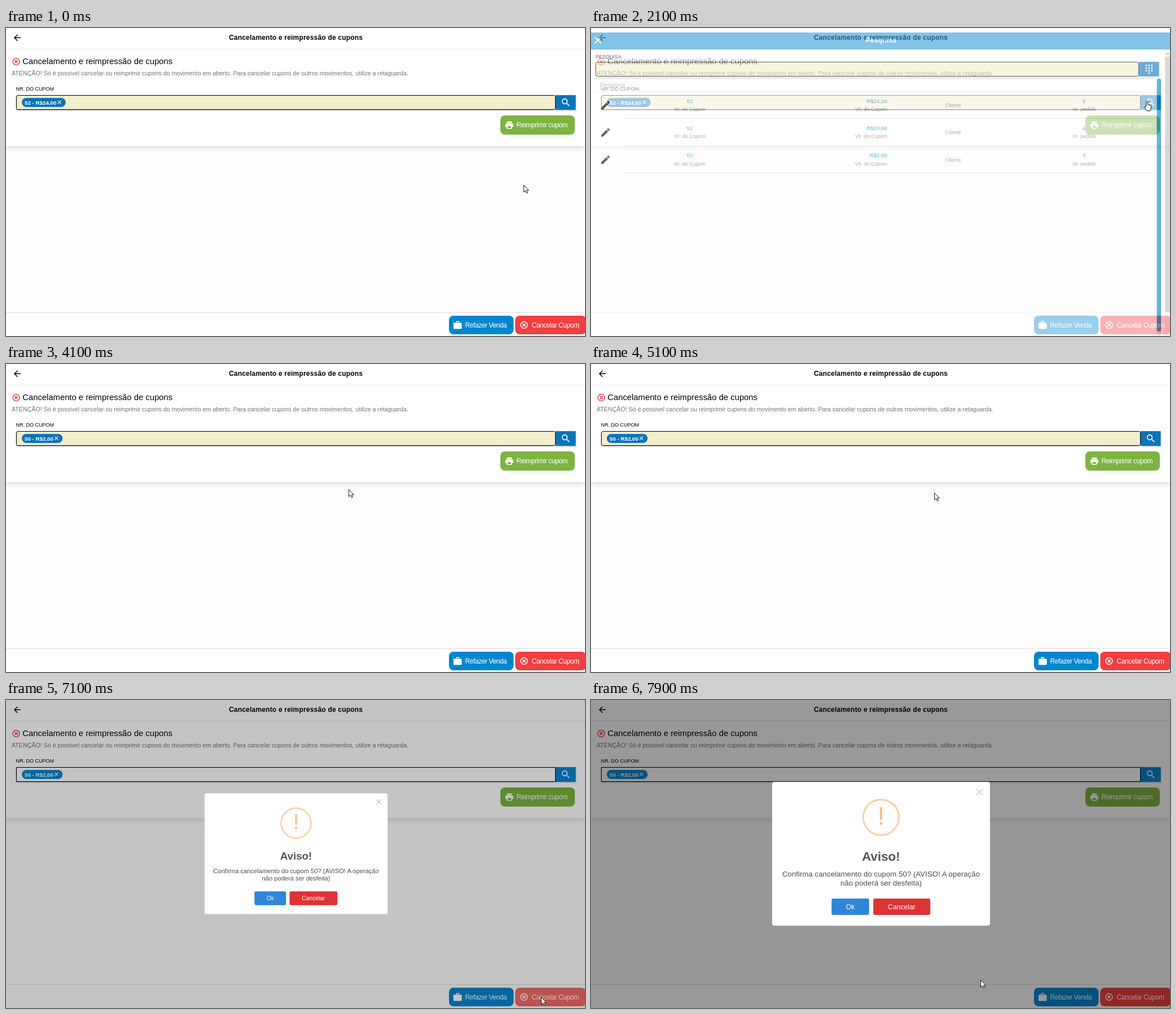
An HTML page for the animation above (8 s loop, 1026x546 px).

```html
<!DOCTYPE html>
<html lang="pt-BR">
<head>
<meta charset="utf-8">
<title>Cancelamento de cupons</title>
<style>
html, body { margin: 0; width: 100%; height: 100%; overflow: hidden; background: #fff; }
svg { display: block; width: 100vw; height: 100vh; font-family: "Liberation Sans", Arial, sans-serif; }
text { white-space: pre; }
.title { font-weight: bold; font-size: 12px; letter-spacing: .2px; text-anchor: middle; }
.label { font-size: 9px; }
.btn { font-size: 12px; letter-spacing: -.43px; fill: #fff; }
.chip { font-weight: bold; font-size: 9.75px; fill: #fff; }
.value { font-size: 9.75px; fill: #0086cc; }
.hint { font-size: 9px; fill: #777; }
.mid { text-anchor: middle; }
.end { text-anchor: end; }
.line { fill: none; stroke-linecap: butt; }
.card { filter: drop-shadow(0 3px 4px rgba(0, 0, 0, .14)); }
.lift { filter: drop-shadow(0 1px 1px rgba(0, 0, 0, .35)); }
</style>
</head>
<body>
<svg viewBox="0 0 1026 546" preserveAspectRatio="none">
  <defs>
    <path id="back" d="M20 11H7.83l5.59-5.59L12 4l-8 8 8 8 1.41-1.41L7.83 13H20z"/>
    <path id="find" d="M15.5 14h-.79l-.28-.27A6.47 6.47 0 0 0 16 9.5 6.5 6.5 0 1 0 9.5 16c1.61 0 3.09-.59 4.23-1.57l.27.28v.79l5 4.99L20.49 19zm-6 0a4.5 4.5 0 1 1 0-9 4.5 4.5 0 0 1 0 9z"/>
    <path id="print" d="M19 8H5a3 3 0 0 0-3 3v6h4v4h12v-4h4v-6a3 3 0 0 0-3-3zm-3 11H8v-5h8zm3-7a1 1 0 1 1 0-2 1 1 0 0 1 0 2zM18 3H6v4h12z"/>
    <path id="bag" d="M20 6h-4V4a2 2 0 0 0-2-2h-4a2 2 0 0 0-2 2v2H4a2 2 0 0 0-2 2v11a2 2 0 0 0 2 2h16a2 2 0 0 0 2-2V8a2 2 0 0 0-2-2zm-6 0h-4V4h4z"/>
    <path id="edit" d="M3 17.25V21h3.75L17.81 9.94l-3.75-3.75zM20.71 7.04a1 1 0 0 0 0-1.41l-2.34-2.34a1 1 0 0 0-1.41 0l-1.83 1.83 3.75 3.75z"/>
    <path id="cross" class="line" d="M-1-1L1 1M1-1L-1 1" vector-effect="non-scaling-stroke"/>
    <g id="ban" class="line" stroke-width="1.5">
      <circle r="6"/>
      <path d="M-2.6-2.6L2.6 2.6M2.6-2.6L-2.6 2.6"/>
    </g>
  </defs>

  <g id="page">
    <rect width="1026" height="546" fill="#fdfdfd"/>
    <rect class="card" y="20" width="1026" height="189.5" rx="4" fill="#fff"/>
    <rect width="1026" height="37" fill="#fff"/>
    <rect y="37" width="1026" height="1" fill="#e6e6e6"/>
    <use href="#back" transform="translate(11 8.2) scale(.75)"/>
    <text class="title" x="513.6" y="21">Cancelamento e reimpressão de cupons</text>
    <use href="#ban" x="18" y="59.5" stroke="#f04141"/>
    <text x="29.3" y="64" font-size="14.8">Cancelamento e reimpressão de cupons</text>
    <text x="10" y="84" font-size="10.67" fill="#737373">ATENÇÃO! Só é possivel cancelar ou reimprimir cupons do movimento em aberto. Para cancelar cupons de outros movimentos, utilize a retaguarda.</text>
    <text class="label" x="17.5" y="111.3">NR. DO CUPOM</text>
    <g class="lift">
      <rect id="field" x="18.5" y="119.5" width="955" height="25" stroke="#000"/>
      <rect id="search" x="974" y="119" width="35.5" height="26"/>
    </g>
    <use href="#find" fill="#fff" transform="translate(982.6 122.5) scale(.79)"/>
    <rect id="chip" x="28" y="124" height="16" rx="8"/>
    <text id="chipText" class="chip" x="33" y="136.2"></text>
    <use id="chipX" href="#cross" stroke="#fff" stroke-width="1.1"/>
    <rect id="reprint" x="876" y="155" width="132" height="34" rx="8"/>
    <use href="#print" fill="#fff" transform="translate(883.3 163.6) scale(.72)"/>
    <text class="btn" x="904.5" y="176.4">Reimprimir cupom</text>
    <rect y="504" width="1026" height="42" fill="#fff"/>
    <rect y="504" width="1026" height="1" fill="#dcdcdc"/>
    <rect x="785" y="510" width="114.5" height="33" rx="8" fill="#0086d1"/>
    <use href="#bag" fill="#fff" transform="translate(791.4 518) scale(.74)"/>
    <text class="btn" x="813.5" y="530.7">Refazer Venda</text>
    <rect id="cancel" x="902.3" y="510" width="125.5" height="33" rx="8"/>
    <use href="#ban" x="918" y="526.5" stroke="#fff"/>
    <text class="btn" x="931.5" y="530.7">Cancelar Cupom</text>
  </g>

  <g id="lookup">
    <rect width="1026" height="546" fill="#fff"/>
    <rect width="1026" height="30" fill="#329cd4"/>
    <use href="#cross" stroke="#fff" stroke-width="1.8" transform="translate(12.3 13.5) scale(5.7)"/>
    <text class="title" x="514" y="17.5" fill="#fff">Pesquisa</text>
    <text class="label" x="8" y="46">PESQUISA</text>
    <g class="lift">
      <rect x="8.5" y="52.5" width="962" height="25" rx="3" fill="#f4efce" stroke="#000"/>
      <rect x="971" y="52" width="35.5" height="25.5" fill="#0b74b8"/>
    </g>
    <g id="dots" fill="#fff"></g>
    <rect x="5" y="80" width="998" height="1" fill="#ededed"/>
    <rect x="5" y="81" width="998" height="1" fill="#d2d2d2"/>
    <rect x="5" y="82" width="998" height="1" fill="#efefef"/>
    <text x="16" y="96.5" font-size="10.5" fill="#999">Registros</text>
    <rect x="5" y="104" width="998" height="1" fill="#dedede"/>
    <g id="rows"></g>
    <rect x="1003" y="82" width="7" height="464" fill="#e2e2e2"/>
    <rect x="1002.7" y="82" width="7.5" height="448" rx="3" fill="#0880be"/>
    <rect x="1017" y="30" width="9" height="516" fill="#f1f1f1"/>
    <rect x="1017.5" y="43" width="8.5" height="452" fill="#c1c1c1"/>
    <path d="M1019 39l3-3 3 3z" fill="#888"/>
    <path d="M1019 539l3 3 3-3z" fill="#444"/>
  </g>

  <rect id="shade" width="1026" height="546"/>
  <g id="dialog">
    <rect x="321" y="145" width="386" height="255" rx="4" fill="#fff"/>
    <use href="#cross" stroke="#c4c4c4" stroke-width="1.3" transform="translate(688.5 163.2) scale(5.2)"/>
    <circle cx="514" cy="208" r="31.6" fill="none" stroke="#facea8" stroke-width="3"/>
    <text class="mid" x="514" y="220.5" font-size="45" fill="#f8bb86">!</text>
    <text class="mid" x="514" y="285" font-size="22.3" font-weight="bold" fill="#555">Aviso!</text>
    <g class="mid" font-size="13.3" fill="#4c4c4c">
      <text x="514" y="313">Confirma cancelamento do cupom 50? (AVISO! A operação</text>
      <text x="514" y="329.3">não poderá ser desfeita)</text>
    </g>
    <rect x="426.3" y="352" width="66.5" height="29" rx="3" fill="#3085d6"/>
    <rect x="500.2" y="352" width="101" height="29" rx="3" fill="#d33"/>
    <g class="mid" font-size="12.2" fill="#fff">
      <text x="459.5" y="371">Ok</text>
      <text x="550.5" y="371">Cancelar</text>
    </g>
  </g>

  <g id="cursor" fill="#fff" stroke="#000" stroke-linejoin="round">
    <path id="arrow" stroke-width=".9" d="M0 0V12.6L2.9 9.9 5 14.4 7 13.5 5 9.2H8.9Z"/>
    <path id="hand" d="M-1.2 9.5V1.8a1.4 1.4 0 0 1 2.8 0V6.2l4.4 1.1c1.2.3 1.6.9 1.5 2.2l-.5 4.4c-.2 1.5-1 3.4-1 3.4H.2l-4-5.6c-1-1.6.6-2.8 1.6-1.6Z"/>
  </g>
</svg>
<script>
const $ = id => document.getElementById(id);
const set = (id, attrs) => {
  for (const k in attrs) $(id).setAttribute(k, attrs[k]);
};
const show = (id, on) => { $(id).style.display = on ? '' : 'none'; };

// Static lists
let dots = '';
for (let i = 0; i < 10; i++) {
  const col = i < 9 ? i % 3 : 1;
  dots += `<circle cx="${984 + col * 4.9}" cy="${58.3 + Math.floor(i / 3) * 4.6}" r="1.5"/>`;
}
$('dots').innerHTML = dots;

$('rows').innerHTML = [[52, '24,00', 5], [51, '20,00', 4], [50, '2,00', 3]].map(([nr, sum, order], i) => `
  <g transform="translate(0 ${i * 48.3})">
    <use href="#edit" transform="translate(15.7 119) scale(.83)"/>
    <text class="value mid" x="175" y="124.6">${nr}</text>
    <text class="hint mid" x="175.3" y="139">Nr. do Cupom</text>
    <text class="value end" x="525" y="124.6">R$${sum}</text>
    <text class="hint end" x="525" y="139">Vlr. do Cupom</text>
    <text class="hint mid" x="641.5" y="132">Cliente</text>
    <text class="value mid" x="873.5" y="124.6">${order}</text>
    <text class="hint mid" x="874" y="139">Nr. pedido</text>
    <rect x="59" y="152" width="944" height="1" fill="#d4d4d4"/>
  </g>`).join('');

const linear = u => u;
const smooth = u => u * u * (3 - 2 * u);
const easeIn = u => u ** 1.3;
const easeOut = u => 1 - (1 - u) ** 1.7;

// Pointer stops: time, x, y, easing on the way there
const stops = [
  [0, 917.5, 278.5, linear], [400, 917.5, 278.5, linear],
  [1300, 985, 141, smooth], [1500, 985, 129.5, linear],
  [2400, 985, 129.5, linear], [3100, 702, 198.5, smooth],
  [3200, 702, 198.5, linear], [3700, 607.5, 222.5, easeOut],
  [5000, 607.5, 223, linear], [5100, 608.5, 228.5, linear],
  [5900, 852.5, 420.5, easeIn], [6600, 945, 522.5, easeOut],
  [6700, 945, 522.5, linear], [6800, 948.5, 527, linear],
  [7100, 948.5, 527, linear], [7900, 690.5, 496.5, smooth]
];
// Dialog scale: ms since opening, scale
const pops = [[0, .7], [135, 1.05], [240, .95], [300, 1]];

function track(table, t, col, ease) {
  const i = table.findIndex(row => row[0] > t);
  if (i < 0) return table[table.length - 1][col];
  const a = table[i - 1], b = table[i];
  return a[col] + (b[col] - a[col]) * ease(b)((t - a[0]) / (b[0] - a[0]));
}

function draw(t) {
  const x = track(stops, t, 1, s => s[3]);
  const y = track(stops, t, 2, s => s[3]);
  const over = (l, top, r, b) => x >= l && x <= r && y >= top && y <= b;

  const asking = t >= 7100;
  const onPage = t < 2100 || t >= 4100;
  const overPrint = onPage && over(876, 155, 1008, 189);
  const overCancel = onPage && t < 7200 && over(902, 510, 1026, 543);
  const overSearch = t >= 1400 && t < 2100;
  const isHand = !asking && (overPrint || overCancel || (t >= 1300 && t < 2500));

  const picked = t >= 4000;
  const blue = asking ? '#0086d1' : '#0b74b8';
  set('field', { fill: asking ? '#fff' : '#f3edcc', rx: asking ? 0 : 3 });
  set('search', { fill: overSearch ? '#4d8dff' : blue });
  set('chip', { fill: blue, width: picked ? 72.3 : 77.7 });
  $('chipText').textContent = picked ? '50 - R$2,00' : '52 - R$24,00';
  set('chipX', { transform: `translate(${picked ? 89.3 : 94.7} 131.7) scale(3)` });
  set('reprint', { fill: overPrint ? '#8fc05c' : '#7cb342' });
  set('cancel', { fill: overCancel ? '#f56a6a' : '#f23f41' });

  const moving = t === 2100 || t === 4000;
  show('lookup', t >= 2100 && t < 4100);
  set('lookup', { opacity: moving ? .6 : 1, transform: `translate(0 ${moving ? 8 : 0})` });

  show('shade', asking);
  show('dialog', asking);
  if (asking) {
    const k = track(pops, t - 7100 + 54, 1, () => linear);
    set('shade', { 'fill-opacity': t < 7200 ? .23 : .4 });
    set('dialog', { transform: `translate(514 272.5) scale(${k}) translate(-514 -272.5)` });
  }

  show('hand', isHand);
  show('arrow', !isHand);
  set('cursor', { transform: `translate(${x} ${y})` });
}

const start = performance.now();
function tick() {
  const t = Math.max(0, performance.now() - start) % 8000;
  draw(Math.floor(t / 100) * 100);
  requestAnimationFrame(tick);
}
tick();
</script>
</body>
</html>
```
